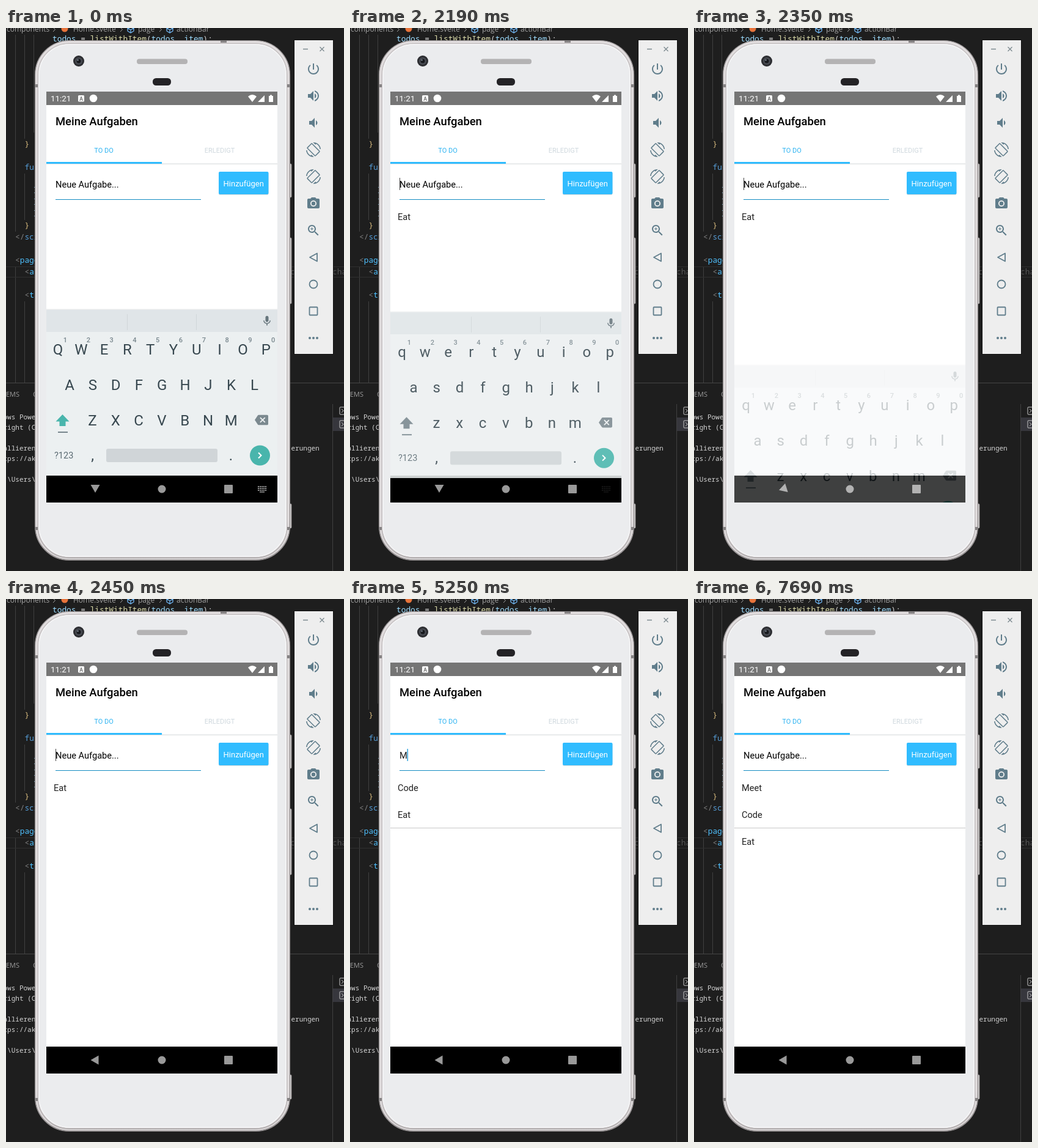
An HTML page that plays this animation: 553x888 px, repeating every 8000 ms.

```html
<!DOCTYPE html>
<html lang="de">
<head>
<meta charset="utf-8">
<title>Meine Aufgaben</title>
<style>
html, body { margin: 0; width: 100%; height: 100%; overflow: hidden; background: #1e1e1e; }
svg { display: block; font-family: Roboto, sans-serif; }
text { white-space: pre; }
.ui { font-family: "Open Sans", sans-serif; }
.code { font: 12.83px "Noto Sans Mono", monospace; }
.term { font: 11px "Noto Sans Mono", monospace; }
</style>
</head>
<body>
<svg id="stage" width="553" height="888" viewBox="0 0 553 888"></svg>
<script>
const LOOP = 8000;
const stage = document.getElementById('stage');

const rect = (x, y, w, h, fill, more = '') =>
  `<rect x="${x}" y="${y}" width="${w}" height="${h}" fill="${fill}" ${more}/>`;
const circle = (x, y, r, fill, more = '') =>
  `<circle cx="${x}" cy="${y}" r="${r}" fill="${fill}" ${more}/>`;
const path = (d, fill, more = '') => `<path d="${d}" fill="${fill}" ${more}/>`;
const line = (d, color, width = 1, more = '') =>
  path(d, 'none', `stroke="${color}" stroke-width="${width}" ${more}`);
const text = (x, y, s, size, fill, more = '') =>
  `<text x="${x}" y="${y}" font-size="${size}" fill="${fill}" ${more}>${s}</text>`;
const mid = 'text-anchor="middle"';
const icon = (x, y, size, d, fill, flip = 1) =>
  `<g transform="translate(${x} ${y}) scale(${flip * size / 24} ${size / 24}) translate(-12 -12)">${path(d, fill)}</g>`;
const esc = s => s.replace(/</g, '&lt;');
// Coloured code: alternating text and colour
const code = (x, y, ...parts) => {
  let spans = '';
  for (let i = 0; i < parts.length; i += 2) {
    spans += `<tspan fill="${parts[i + 1]}">${esc(parts[i])}</tspan>`;
  }
  return `<text class="code" x="${x}" y="${y}">${spans}</text>`;
};

const ICONS = {
  power: 'M13 3h-2v10h2V3zm4.83 2.17l-1.42 1.42C17.99 7.86 19 9.81 19 12c0 3.87-3.13 7-7 7s-7-3.13-7-7c0-2.19 1.01-4.14 2.58-5.42L6.17 5.17C4.23 6.82 3 9.26 3 12c0 4.97 4.03 9 9 9s9-4.03 9-9c0-2.74-1.23-5.18-3.17-6.83z',
  louder: 'M3 9v6h4l5 5V4L7 9H3zm13.5 3c0-1.77-1.02-3.29-2.5-4.03v8.05c1.48-.73 2.5-2.25 2.5-4.02zM14 3.23v2.06c2.89.86 5 3.54 5 6.71s-2.11 5.85-5 6.71v2.06c4.01-.91 7-4.49 7-8.77s-2.99-7.86-7-8.77z',
  quieter: 'M5 9v6h4l5 5V4L9 9H5zm13.5 3c0-1.77-1.02-3.29-2.5-4.03v8.05c1.48-.73 2.5-2.25 2.5-4.02z',
  rotate: 'M16.48 2.52c3.27 1.55 5.61 4.72 5.97 8.48h1.5C23.44 4.84 18.29 0 12 0l-.66.03 3.81 3.81 1.33-1.32zm-6.25-.77c-.59-.59-1.54-.59-2.12 0L1.75 8.11c-.59.59-.59 1.54 0 2.12l12.02 12.02c.59.59 1.54.59 2.12 0l6.36-6.36c.59-.59.59-1.54 0-2.12L10.23 1.75zm4.6 19.44L2.81 9.17l6.36-6.36 12.02 12.02-6.36 6.36zm-7.31.29C4.25 19.94 1.91 16.76 1.55 13H.05C.56 19.16 5.71 24 12 24l.66-.03-3.81-3.81-1.33 1.32z',
  camera: 'M12 8.8a3.2 3.2 0 1 0 0 6.4 3.2 3.2 0 0 0 0-6.4zM9 2L7.17 4H4c-1.1 0-2 .9-2 2v12c0 1.1.9 2 2 2h16c1.1 0 2-.9 2-2V6c0-1.1-.9-2-2-2h-3.17L15 2H9zm3 15c-2.76 0-5-2.24-5-5s2.24-5 5-5 5 2.24 5 5-2.24 5-5 5z',
  zoom: 'M15.5 14h-.79l-.28-.27C15.41 12.59 16 11.11 16 9.5 16 5.91 13.09 3 9.5 3S3 5.91 3 9.5 5.91 16 9.5 16c1.61 0 3.09-.59 4.23-1.57l.27.28v.79l5 4.99L20.49 19l-4.99-5zm-6 0C7.01 14 5 11.99 5 9.5S7.01 5 9.5 5 14 7.01 14 9.5 11.99 14 9.5 14zm2.5-4h-2v2H9v-2H7V9h2V7h1v2h2v1z',
  mic: 'M12 14c1.66 0 3-1.34 3-3V5c0-1.66-1.34-3-3-3S9 3.34 9 5v6c0 1.66 1.34 3 3 3zm5.3-3c0 3-2.54 5.1-5.3 5.1S6.7 14 6.7 11H5c0 3.41 2.72 6.23 6 6.72V21h2v-3.28c3.28-.48 6-3.3 6-6.72h-1.7z',
  erase: 'M22 3H7c-.69 0-1.23.35-1.59.88L0 12l5.41 8.11c.36.53.9.89 1.59.89h15c1.1 0 2-.9 2-2V5c0-1.1-.9-2-2-2zm-3 12.59L17.59 17 14 13.41 10.41 17 9 15.59 12.59 12 9 8.41 10.41 7 14 10.59 17.59 7 19 8.41 15.41 12 19 15.59z'
};

function editor() {
  const grey = '#808080', blue = '#569cd6', sky = '#4fc1ff', pale = '#9cdcfe', plain = '#d4d4d4', gold = '#d7ba7d';
  const crumb = (x, s) => text(x, 6, s, 12, '#a0a0a0', 'class="ui"');
  const chevron = x => line(`M${x} -1l3.5 3.5-3.5 3.5`, '#a0a0a0');
  const cube = x => line(`M${x} 0l5-3 5 3v5l-5 3-5-3zM${x} 0l5 3 5-3M${x + 5} 3v5`, '#75beff', 1.2);
  const term = (x, y, s) => text(x, y, s, 11, '#d4d4d4', 'class="term"');
  const shell = y => line(`M553 ${y - 6}h-6q-1 0-1 1v10q0 1 1 1h6M549 ${y - 3}l3 3-3 3`, '#c5c5c5');
  return rect(0, 0, 553, 888, '#1e1e1e') +
    line('M15.5 11V333M30.5 11V181M45.5 11V171M30.5 238V314M15.5 390V580M30.5 447V580', '#404040') +
    rect(-1, 390.5, 556, 17, 'none', 'stroke="#303030"') +
    rect(0, 0, 553, 10, '#1e1e1e') +
    crumb(1, 'components') + chevron(77) + circle(96, 1, 5.5, '#e8743b') +
    crumb(110, 'Home.svelte') + chevron(187) + cube(199) + crumb(216, 'page') +
    chevron(251) + cube(263) + crumb(279, 'actionBar') +
    code(76, 22, 'todos', pale, ' = ', plain, 'listWithItem', '#dcdcaa', '(', plain, 'todos', pale,
      ', ', plain, 'item', pale, ');', plain) +
    code(30.5, 194, '}', gold) + code(30.5, 232, 'function', blue) +
    [270, 289, 308].map(y => code(45, y, 'l', pale)).join('') +
    code(30.5, 327, '}', gold) +
    code(15, 346, '</', grey, 'script', blue, '>', grey) +
    code(15, 384, '<', grey, 'page', sky, '>', grey) +
    code(30.5, 403, '<', grey, 'actionBar', sky) +
    code(30.5, 441, '<', grey, 'tabs', sky) +
    code(465, 403, 'c', '#555') + code(534, 403, 'cha', '#555') +
    line('M0 580.5H553', '#454545') +
    text(0, 603, 'EMS', 11, '#9a9a9a', 'class="ui"') + text(44, 603, 'OUTPUT', 11, '#9a9a9a', 'class="ui"') +
    term(-4.5, 640, 'ows Powe') + term(-4.5, 657, 'right (C') + term(-4.5, 691, 'allieren') +
    term(-4.5, 708, 'tps://ak') + term(-4.5, 742, ' \\Users\\') + term(466.5, 691, 'erungen') +
    line('M534.5 615V888', '#414141') + rect(535, 637, 18, 22, '#37373d') + shell(626) + shell(648);
}

function toolbar() {
  const c = '#607d8b';
  return rect(471.5, 19.5, 64, 514, '#eeeeee', 'stroke="#111"') +
    line('M486 34.5H494M513.5 31l7 7M520.5 31l-7 7', '#7d8a90', 1.3) +
    ['power', 'louder', 'quieter', 'rotate', 'rotate', 'camera', 'zoom']
      .map((name, i) => icon(503, 67 + i * 44, 24, ICONS[name], c, i === 4 ? -1 : 1)).join('') +
    line('M497 375L509 368.5V381.5Z', c, 1.8, 'stroke-linejoin="round"') +
    circle(503, 419, 6.5, 'none', `stroke="${c}" stroke-width="1.8"`) +
    rect(496.5, 456.5, 13, 13, 'none', `rx="1" stroke="${c}" stroke-width="1.8"`) +
    [497, 503, 509].map(x => circle(x, 507, 2, c)).join('');
}

function phone() {
  const key = (y, h) => rect(461, y, 6, h, '#d9d7d8', 'rx="1.5" stroke="#8d898a" stroke-width=".8"');
  const shell = (inset, r, fill, stroke, w) =>
    rect(47 + inset, 20 + inset, 418 - 2 * inset, 851 - 2 * inset, fill, `rx="${r}" stroke="${stroke}" stroke-width="${w}"`);
  return key(222, 55) + key(343, 108) + key(778, 40) +
    shell(.5, 56, 'url(#rim)', '#8f8b8c', 1.2) + shell(3, 53.5, 'none', '#e6e2e3', 1.5) +
    shell(5.5, 51, '#ebecee', '#c2bdbe', 1.2) + shell(7, 49.5, 'none', '#f6f6f7', 1.5) +
    [[47, 92, 5, 5], [460, 92, 5, 5], [47, 816, 5, 5], [460, 816, 5, 5], [351, 20, 10, 4]]
      .map(b => rect(...b, '#858283')).join('') +
    circle(119, 54, 9, '#2c2d31') + circle(119, 54, 6, '#484b52') + circle(119, 54, 3.5, '#17191d') +
    circle(117.5, 52.5, 1.3, '#77808c') +
    rect(214, 50.5, 83, 8.5, '#b4b3b4', 'rx="4"') +
    rect(240, 82, 30, 12, '#242326', 'rx="5.5"');
}

function app() {
  return rect(66, 104, 378, 672, '#fff') + rect(66, 104, 378, 22, '#757575') +
    text(73, 120, '11:21', 13.4, '#fff') +
    rect(118, 110, 10, 10.5, '#fff', 'rx="1.5"') + text(123, 118.5, 'A', 8.5, '#757575', mid + ' font-weight="700"') +
    circle(143, 115, 6.3, '#fff') +
    path('M396 112Q403 106 410 112L403 121Z M412 121H423V110Z', '#fff') +
    path('M430 111h2v-1.5h3v1.5h2v10h-7z', '#fff') +
    text(81, 159, 'Meine Aufgaben', 18.4, '#000', 'font-weight="500"') +
    text(160, 204, 'TO DO', 11, '#30b4f2', mid) + text(349.5, 204, 'ERLEDIGT', 11, '#cfd8de', mid) +
    rect(66, 221.5, 378, 1.5, '#e2e4e5') + rect(66, 219, 189, 3, '#30bcff') +
    rect(348, 236, 81.5, 37, '#dcdcdc', 'rx="2"') + rect(348, 235, 81.5, 37, '#30bcff', 'rx="2"') +
    text(388.7, 259, 'Hinzufügen', 13, '#fff', mid) +
    rect(81, 280, 238, 1, '#168cc2') +
    '<text id="field" x="81" y="261" font-size="14.6"/><rect id="caret" y="245" height="20"/>' +
    [314, 358, 402].map(y => `<text class="item" x="78" y="${y}" font-size="14.6" fill="#212121"/>`).join('') +
    '<rect id="rule" x="66" y="374" width="378" height="1" fill="#c8c8c8"/>' +
    rect(66, 732, 378, 44, '#000');
}

function letters(upper) {
  const c = '#37474f', step = 37.8;
  return [['qwertyuiop', 85, 534], ['asdfghjkl', 104, 592], ['zxcvbnm', 141.5, 650]]
    .map(([keys, x, y]) => [...(upper ? keys.toUpperCase() : keys)]
      .map((k, i) => text(x + i * step, y, k, 24, c, mid)).join('')).join('');
}

function keyboard() {
  const c = '#37474f', soft = '#78868d';
  const digits = [...'1234567890']
    .map((d, i) => text(97 + i * 37.8, 514, d, 11, soft, mid + ' font-weight="500"')).join('');
  return rect(66, 459.5, 378, 2, '#e9ebec') + rect(66, 461, 378, 36, '#e0e5e8') + rect(66, 497, 378, 235, '#ecf0f1') +
    rect(66, 732, 378, 44, '#000') + line('M198.5 468V494M311.5 468V494', '#d0d6d9') +
    icon(427, 479, 20, ICONS.mic, '#66757c') + digits +
    `<g id="upper">${letters(true)}</g><g id="lower">${letters(false)}</g>` +
    '<path id="shift" d="M92.5 632L103.5 643.5H97.5V651H87.5V643.5H81.5Z"/>' + rect(85, 660, 16, 2, soft) +
    icon(418, 641, 22, ICONS.erase, '#7b898f') +
    text(79, 704, '?123', 14.5, '#5a6a72') + text(141.5, 707, ',', 24, c, mid) +
    rect(164, 688, 182, 22, '#d0d5d8', 'rx="3"') + text(368, 707, '.', 24, c, mid) +
    circle(415.5, 699, 16.5, '#49b5ac') + line('M413 694.5l4.5 4.5-4.5 4.5', '#fff', 2);
}

function navKeys() {
  const dots = [0, 1, 2].map(r => [0, 1, 2, 3, 4].map(k => rect(412 + k * 3, 749 + r * 3, 2, 2, '#fff')).join('')).join('');
  return '<g opacity=".6"><path id="back" d="M-7.5 -6.5H7.5L0 6.5Z" fill="#fff"/>' +
    circle(255, 754, 6.5, '#fff') + rect(357, 747, 14, 14, '#fff', 'rx="1"') +
    `<g id="switcher">${dots}${rect(415, 758, 8, 1.5, '#fff')}</g></g>`;
}

stage.innerHTML = '<defs><clipPath id="screen"><rect x="66" y="104" width="378" height="672"/></clipPath>' +
  '<linearGradient id="rim" x2="0" y2="1"><stop offset=".92" stop-color="#d6d2d3"/>' +
  '<stop offset="1" stop-color="#a5a1a2"/></linearGradient></defs>' +
  editor() + toolbar() + phone() +
  `<g clip-path="url(#screen)">${app()}<g id="keys">${keyboard()}</g>${navKeys()}</g>`;

const $ = id => document.getElementById(id);
const [field, caret, rule, keys, upper, lower, shift, back, switcher] =
  ['field', 'caret', 'rule', 'keys', 'upper', 'lower', 'shift', 'back', 'switcher'].map($);
const items = [...document.querySelectorAll('.item')];

// Each task: times of its letters, then the time it is added
const TASKS = [
  ['Eat', [1090, 1400, 1770], 2190],
  ['Code', [3030, 3630, 3970, 4340], 4580],
  ['Meet', [5250, 5460, 5770, 6140], 6690]
];
const HIDE = 2190;
const clamp = v => Math.min(1, Math.max(0, v));
const show = (el, on) => el.setAttribute('visibility', on ? 'visible' : 'hidden');

function draw(t) {
  const list = TASKS.filter(k => t >= k[2]).map(k => k[0]).reverse();
  const task = TASKS.find(k => t < k[2]);
  const typed = task ? task[0].slice(0, task[1].filter(at => t >= at).length) : '';

  field.textContent = typed || 'Neue Aufgabe...';
  field.setAttribute('fill', typed ? '#212121' : '#000');
  caret.setAttribute('x', typed ? 81 + field.getComputedTextLength() - .3 : 81);
  caret.setAttribute('width', typed ? 1.6 : 1);
  caret.setAttribute('fill', typed ? '#3aa6dc' : '#444');
  show(caret, !(t < 80 || (t >= 860 && t < 1090) || t >= 7690));
  items.forEach((el, i) => { el.textContent = list[i] || ''; });
  show(rule, list.length > 1);

  const caps = t < 1140;
  upper.setAttribute('display', caps ? 'inline' : 'none');
  lower.setAttribute('display', caps ? 'none' : 'inline');
  shift.setAttribute('fill', caps ? '#49b5ac' : '#78868d');

  const closing = t >= HIDE;
  const p = (t - HIDE) / 100;
  const drop = closing ? 4 + 48 * Math.pow(p, 1.25) : 0;
  keys.setAttribute('transform', `translate(0 ${drop})`);
  keys.setAttribute('opacity', closing ? clamp(.88 - .38 * p) : 1);
  const turn = closing ? 90 * clamp((t - HIDE) / 200) : 0;
  back.setAttribute('transform', `translate(${146 - turn / 90} ${753.5 + turn / 180}) rotate(${turn})`);
  switcher.setAttribute('opacity', closing ? clamp(.15 - .3 * p) : 1);
}

const start = performance.now();
function tick() {
  draw((performance.now() - start) % LOOP);
  requestAnimationFrame(tick);
}
tick();
</script>
</body>
</html>
```
